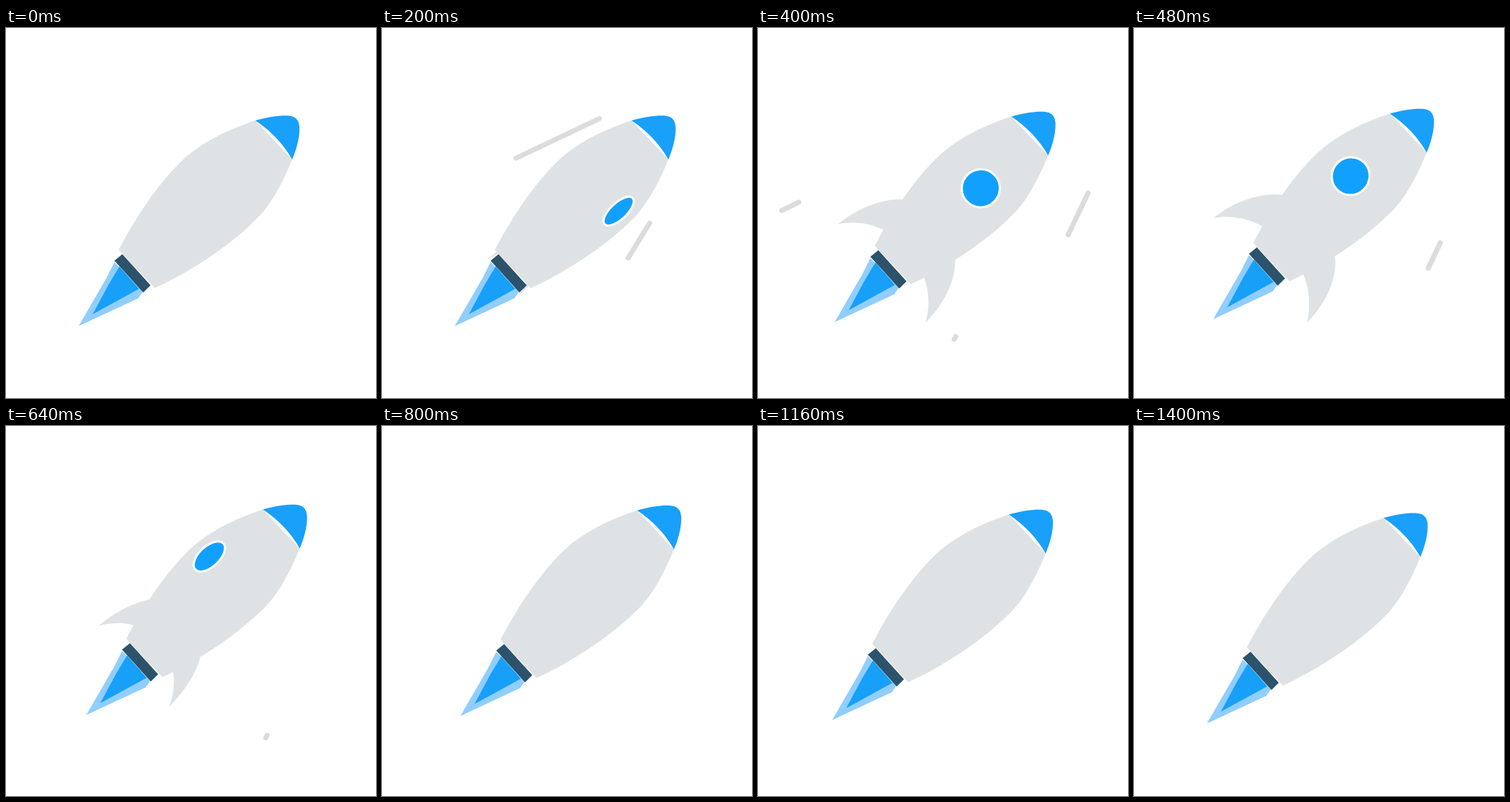
Recreate the animation shown at these times as an HTML page. Size 512 by 512 pixels, loop 1.44 s.

```html
<!DOCTYPE html>
<html lang="en">
<head>
<meta charset="utf-8">
<title>Rocket</title>
<style>
  html, body { margin: 0; width: 100%; height: 100%; overflow: hidden; background: #fff; }
  svg { display: block; width: 100vw; height: 100vh; }
</style>
</head>
<body>
<svg viewBox="0 0 512 512">
  <g id="streaks" stroke="#dcdcdc" stroke-width="7" stroke-linecap="round"></g>
  <g id="rocket">
    <g id="fins" fill="#dfe2e5">
      <path d="M198 240.5C165 236 127 251 101 272.5C125 268 149 273 169 284.5L185 300L215 265Z"/>
      <path d="M269 326.5C273 356 256 392 230 417.5C236 396 234 372 226 352.5L215 330L245 305Z"/>
    </g>
    <path fill="#90ceff" d="M150 324L139 346L100.5 412.5L183 374L190 364Z"/>
    <path fill="#189ff8" d="M157 330L142 355L120 396L184 361Z"/>
    <path fill="#2c536b" d="M150 322L161 313L200 356L190 366Z"/>
    <path fill="#dfe2e5" d="M156 307C175 270 205 222 240 187C267 160 305 141 345 128L396 182C382 216 366 245 349 262C313 299 258 336 206 360Z"/>
    <path fill="#18a0fb" d="M345 128C366 122 390 119 398 123Q405 126 406 136C407 150 402 168 396 182Q378 150 345 128Z"/>
    <g transform="translate(170 344) rotate(-43)">
      <ellipse id="porthole" cx="176.7" rx="26.5" fill="#12a0ff" stroke="#fff" stroke-width="3"/>
    </g>
  </g>
</svg>
<script>
const LOOP = 1440, STEP = 40;
const $ = id => document.getElementById(id);
const rad = deg => deg * Math.PI / 180;

// time, x, y of the drifting rocket
const drift = [
  [0, 0, 0], [240, .3, 0], [320, 2, -1.5], [480, 9, -9.5], [600, 10.8, -12.5],
  [640, 10.5, -12.5], [960, 5.5, -10], [1160, 2, -5.5], [1440, 0, 0]
];

const streaks = [
  { start: 52, end: 566, from: [390, 83], to: [-120, 325], size: 252 },
  { start: 105, end: 476, from: [395, 230], to: [241, 480], size: 102 },
  { start: 330, end: 714, from: [467, 207], to: [335, 483], size: 105 }
];
for (const s of streaks) {
  s.line = document.createElementNS("http://www.w3.org/2000/svg", "line");
  $("streaks").append(s.line);
}

function driftAt(t) {
  const i = drift.findIndex(key => key[0] > t);
  const a = drift[i - 1], b = drift[i], p = (t - a[0]) / (b[0] - a[0]);
  return [1, 2].map(k => a[k] + (b[k] - a[k]) * p);
}

function drawStreak({ start, end, from, to, size, line }, t) {
  const p = (t - start) / (end - start);
  const visible = p > 0 && p < 1;
  line.style.display = visible ? "" : "none";
  if (!visible) return;
  const dx = to[0] - from[0], dy = to[1] - from[1];
  const half = size * Math.min(1, p * 5) * (1 - p) ** 2 / 2 / Math.hypot(dx, dy);
  [-half, half].forEach((offset, i) => {
    line.setAttribute("x" + (i + 1), from[0] + dx * (p + offset));
    line.setAttribute("y" + (i + 1), from[1] + dy * (p + offset));
  });
}

function draw(t) {
  streaks.forEach(s => drawStreak(s, t));
  $("rocket").setAttribute("transform", `translate(${driftAt(t)})`);

  // one roll around the long axis per loop
  const roll = (480 - t) * 360 / LOOP;
  const spread = Math.max(0, Math.cos(rad(roll)));
  $("fins").style.display = spread > 0 ? "" : "none";
  $("fins").setAttribute("transform",
    `translate(170 344) rotate(-43) scale(1 ${spread}) rotate(43) translate(-170 -344)`);

  const turn = roll - 12;
  const ry = 28 * Math.cos(rad(turn * 1.08)) - 1.5;
  const facing = Math.abs(turn) < 90 && ry > 0;
  $("porthole").style.display = facing ? "" : "none";
  if (facing) {
    $("porthole").setAttribute("cy", 50.5 * Math.sin(rad(turn)) - 1.8);
    $("porthole").setAttribute("ry", ry);
  }
}

function tick() {
  draw(Math.floor(performance.now() % LOOP / STEP) * STEP);
  requestAnimationFrame(tick);
}
tick();
</script>
</body>
</html>
```
